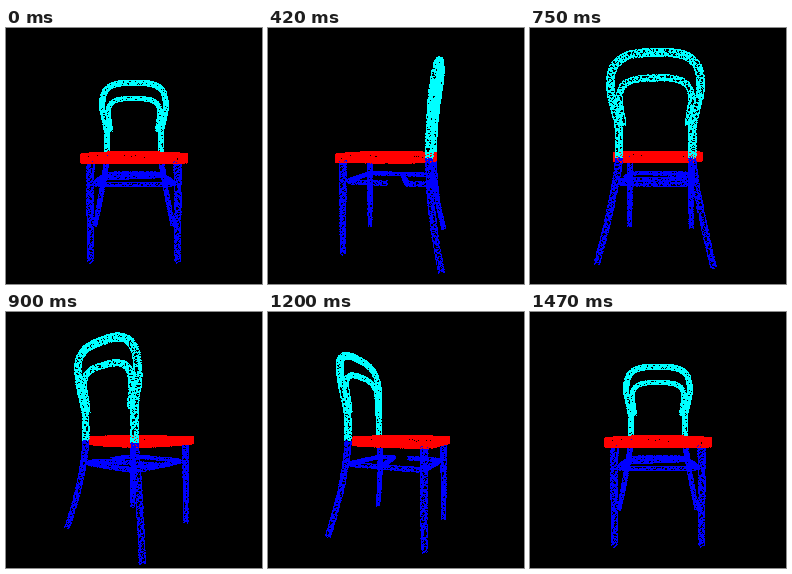
Animation, 256 px wide and 256 px high, one loop 1500 ms. Source, as an HTML page with a canvas:

```html
<!DOCTYPE html>
<html lang="en">
<head>
<meta charset="utf-8">
<title>Rotating chair</title>
<style>
  html, body { margin: 0; width: 100%; height: 100%; overflow: hidden; background: #000; }
  canvas { display: block; width: 100%; height: 100%; image-rendering: pixelated; }
</style>
</head>
<body>
<canvas id="stage" width="256" height="256"></canvas>
<script>
const SIZE = 256, CENTER_X = 128, HORIZON = 118, CAMERA = 227;
const STEP_MS = 30, STEPS = 50;
const DENSITY = 1.2; // points per square unit of surface
// Packed as ABGR
const BLACK = 0xff000000, RED = 0xff0000ff, CYAN = 0xffffff00, BLUE = 0xffff0000;

const cloud = [];
let seed = 7;
function random() {
  seed = (seed * 1664525 + 1013904223) >>> 0;
  return seed / 4294967296;
}

const cross = (a, b) => [
  a[1] * b[2] - a[2] * b[1], a[2] * b[0] - a[0] * b[2], a[0] * b[1] - a[1] * b[0]];
const unit = v => { const n = Math.hypot(...v); return v.map(c => c / n); };
const mix = (a, b, t) => a + (b - a) * t;
const smoothstep = t => t * t * (3 - 2 * t);

// Spread points evenly along a path given as a function of 0..1
function scatter(path, perUnit, place) {
  const pieces = 128;
  let carry = 0;
  for (let i = 0; i < pieces; i++) {
    const a = path(i / pieces), b = path((i + 1) / pieces);
    const delta = b.map((v, j) => v - a[j]);
    carry += Math.hypot(...delta) * perUnit(i / pieces);
    const count = Math.floor(carry);
    carry -= count;
    for (let k = 0; k < count; k++) {
      const t = (k + random()) / count;
      place(a.map((v, j) => v + delta[j] * t), delta, (i + t) / pieces);
    }
  }
}

function tube(path, color, r0, r1 = r0) {
  const radius = t => mix(r0, r1, t);
  let turn = 0;
  scatter(path, t => 2 * Math.PI * radius(t) * DENSITY, (p, dir, t) => {
    const u = unit(cross(dir, [0.6, 0.5, 0.62])), v = unit(cross(dir, u));
    turn += 0.618 + 0.1 * random();
    const c = Math.cos(turn * 2 * Math.PI) * radius(t);
    const s = Math.sin(turn * 2 * Math.PI) * radius(t);
    cloud.push([...p.map((q, j) => q + u[j] * c + v[j] * s), color]);
  });
}

function slab(outline, top, bottom) {
  scatter(outline, () => (bottom - top) * DENSITY, ([x, , z]) =>
    cloud.push([x, mix(top, bottom, random()), z, RED]));
  for (const y of [top, bottom]) {
    scatter(outline, () => 21 * DENSITY, ([x, , z]) => {
      const k = Math.sqrt(random());
      cloud.push([x * k, y, z * k, RED]);
    });
  }
}

// Quarter of a superellipse, from [1, 0] at t = 0 to [0, 1] at t = 1
const corner = (t, power) => [
  Math.cos(t * Math.PI / 2) ** (2 / power) * (t < 1), Math.sin(t * Math.PI / 2) ** (2 / power)];

// Horizontal loop, wider towards the front
const loop = ({ y, width, taper, front, back, frontPower, backPower }) => t => {
  const quarter = t * 4, part = quarter % 2;
  const isFront = quarter < 2;
  const [cx, cz] = corner(part < 1 ? part : 2 - part, isFront ? frontPower : backPower);
  const z = cz * (isFront ? front : back);
  const side = (part < 1) === isFront ? 1 : -1;
  return [side * cx * (width + taper * z), y, z];
};

// Arch of the backrest: sides widen up to the shoulder, then close in a rounded top
const arch = ({ footX, footY, easeY, width, shoulder, top }) => t => {
  const half = 1 - Math.abs(2 * t - 1);
  let x, y;
  if (half < 0.5) {
    y = mix(footY, shoulder, half * 2);
    const rise = Math.max(0, (easeY - y) / (easeY - shoulder));
    x = mix(footX, width, smoothstep(rise));
  } else {
    const [cx, cy] = corner(half * 2 - 1, 3);
    x = cx * width;
    y = mix(shoulder, top, cy);
  }
  const lean = 8.5 * ((7 - y) / 83) ** 2;
  return [t < 0.5 ? x : -x, y, -35.5 - lean];
};

tube(arch({ footX: 31, footY: 10, easeY: -12, width: 37.3, shoulder: -48, top: -75.5 }), CYAN, 3.1);
tube(arch({ footX: 27.8, footY: -17, easeY: -20, width: 30, shoulder: -38, top: -56 }), CYAN, 2.5);

slab(loop({ y: 0, width: 44, taper: 0.05, front: 47, back: -40, frontPower: 8, backPower: 2.4 }), 6.8, 14);
tube(loop({ y: 32, width: 33, taper: 0.03, front: 38.5, back: -36, frontPower: 8, backPower: 8 }), BLUE, 2);

for (const side of [-1, 1]) {
  tube(t => [side * 36, mix(13, 95.5, t), 40], BLUE, 3.1, 2.3);
  tube(t => [side * (31 + 15.8 * t ** 1.25), mix(10, 95.5, t), -35.5 - 10.5 * t * t], BLUE, 3, 2.3);
}

const context = document.getElementById("stage").getContext("2d");
const image = context.createImageData(SIZE, SIZE);
const pixels = new Uint32Array(image.data.buffer);
const depths = new Float32Array(SIZE * SIZE);

function draw(angle) {
  const c = Math.cos(angle), s = Math.sin(angle);
  pixels.fill(BLACK);
  depths.fill(Infinity);
  for (const [x, y, z, color] of cloud) {
    const depth = CAMERA - x * s - z * c;
    const scale = CAMERA / depth;
    const px = Math.floor(CENTER_X + (x * c - z * s) * scale);
    const py = Math.floor(HORIZON + y * scale);
    if (px < 0 || py < 0 || px >= SIZE || py >= SIZE) continue;
    const i = py * SIZE + px;
    if (depth < depths[i]) {
      depths[i] = depth;
      pixels[i] = color;
    }
  }
  context.putImageData(image, 0, 0);
}

let shown = -1;
const start = performance.now();
function tick() {
  const step = Math.floor((performance.now() - start) / STEP_MS) % STEPS;
  if (step !== shown) {
    shown = step;
    draw(2 * Math.PI * step / (STEPS - 1));
  }
  requestAnimationFrame(tick);
}
tick();
</script>
</body>
</html>
```
